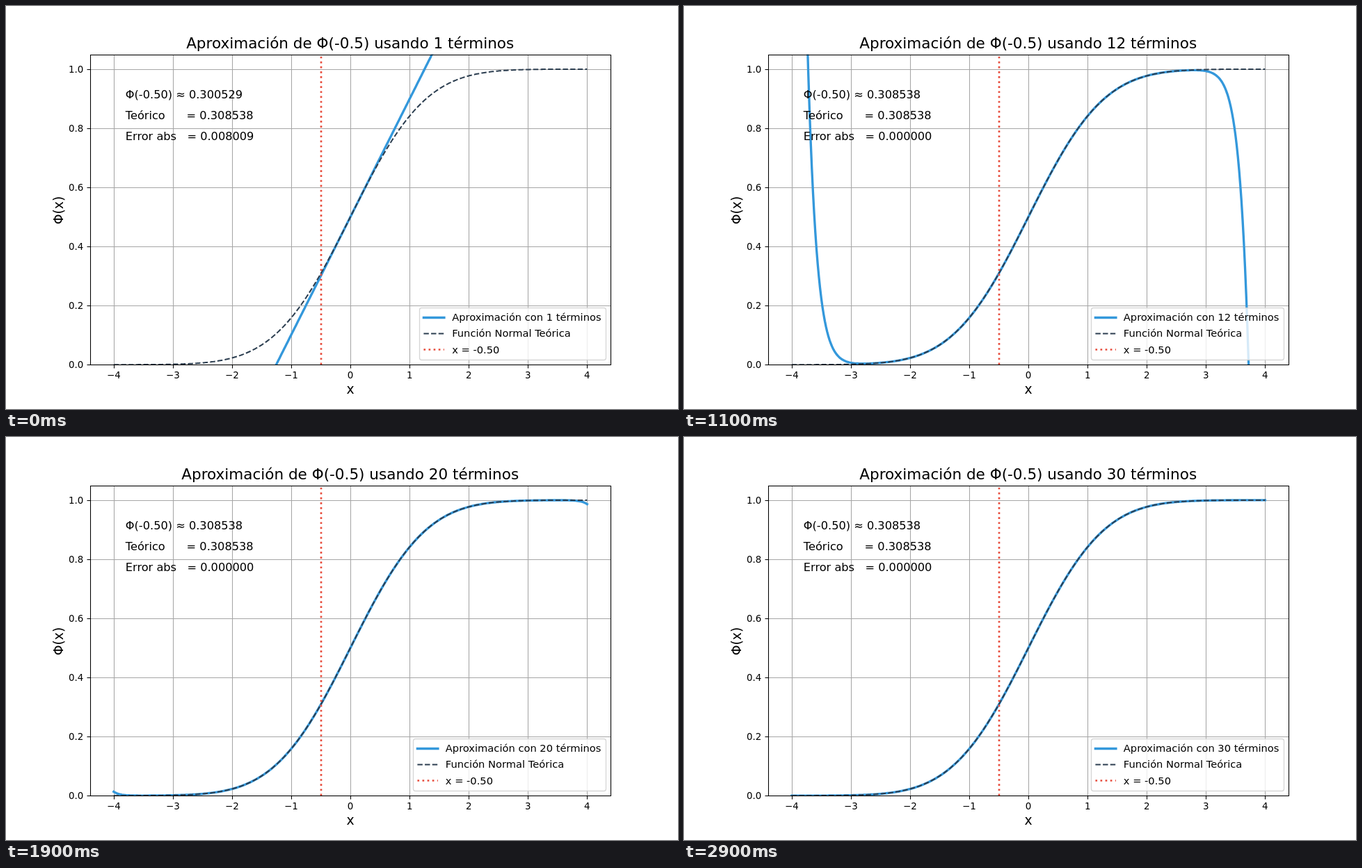
These frames come from a looping animation (966 px wide and 580 px high, 3 s). An HTML page with a canvas:

```html
<!DOCTYPE html>
<html lang="es">
<head>
<meta charset="utf-8">
<title>Aproximación de Φ(x)</title>
<style>
  html, body { margin: 0; width: 100%; height: 100%; overflow: hidden; background: #fff; }
  canvas { display: block; }
</style>
</head>
<body>
<canvas id="stage" width="966" height="580"></canvas>
<script>
const W = 966, H = 580, PT = W / 720;
const STEP_MS = 100, STEPS = 30, X0 = -0.5;
const LEFT = 0.125 * W, RIGHT = 0.9 * W, TOP = 0.12 * H, BOTTOM = 0.89 * H;
const BLUE = '#3498db', NAVY = '#2c3e50', RED = '#e74c3c', GRID = '#a6a6a6';
const ctx = document.getElementById('stage').getContext('2d');

const px = x => LEFT + (x + 4.4) / 8.8 * (RIGHT - LEFT);
const py = y => BOTTOM - y / 1.05 * (BOTTOM - TOP);
const snap = v => Math.floor(v + 0.5) + 0.5;

// Partial sum of the Taylor series of the normal distribution function.
function phi(x, terms) {
  let power = x, sum = 0;
  for (let k = 0; k < terms; k++) {
    sum += power / (2 * k + 1);
    power *= -x * x / (2 * (k + 1));
  }
  return 0.5 + sum / Math.sqrt(2 * Math.PI);
}
const exact = x => phi(x, 70);

// Baselines sit on whole pixels.
function text(str, x, y, points, align = 'left') {
  ctx.font = `${points * PT}px "DejaVu Sans", sans-serif`;
  ctx.textAlign = align;
  ctx.fillStyle = '#000';
  ctx.fillText(str, x, Math.round(y));
}

function stroke(points, color, width, dash = [], cap = 'butt') {
  ctx.beginPath();
  points.forEach(([x, y]) => ctx.lineTo(x, y));
  ctx.strokeStyle = color;
  ctx.lineWidth = width * PT;
  ctx.lineCap = cap;
  ctx.lineJoin = 'round';
  ctx.setLineDash(dash.map(d => d * width * PT));
  ctx.stroke();
  ctx.setLineDash([]);
}

const approxLine = points => stroke(points, BLUE, 2.5, [], 'square');
const exactLine = points => stroke(points, NAVY, 1.5, [3.7, 1.6]);
const markLine = points => stroke(points, RED, 2, [1, 1.65]);

function curve(fn) {
  const points = [];
  for (let i = 0; i <= 400; i++) {
    const x = -4 + i / 50;
    points.push([px(x), py(Math.max(-50, Math.min(50, fn(x))))]);
  }
  return points;
}

function drawGrid() {
  const l = snap(LEFT), r = snap(RIGHT), t = snap(TOP), b = snap(BOTTOM);
  for (let v = -4; v <= 4; v++) {
    const x = snap(px(v));
    stroke([[x, t], [x, b]], GRID, 0.8);
    stroke([[x, b], [x, b + 5]], '#000', 0.8);
    text(String(v).replace('-', '−'), px(v), 536, 10, 'center');
  }
  for (let i = 0; i <= 5; i++) {
    const y = snap(py(i / 5));
    stroke([[l, y], [r, y]], GRID, 0.8);
    stroke([[l - 5, y], [l, y]], '#000', 0.8);
    text((i / 5).toFixed(1), LEFT - 7 * PT, py(i / 5) + 4.9, 10, 'right');
  }
}

function drawFrame() {
  const l = snap(LEFT), t = snap(TOP);
  ctx.strokeStyle = '#000';
  ctx.lineWidth = 0.8 * PT;
  ctx.lineJoin = 'miter';
  ctx.strokeRect(l, t, snap(RIGHT) - l, snap(BOTTOM) - t);
}

function drawLegend(n) {
  const shift = n > 9 ? 9.4 : 0;
  const left = snap(594.4 - shift), labelX = 641.2 - shift;
  ctx.beginPath();
  ctx.roundRect(left, 434.5, 862.5 - left, 75, 3);
  ctx.fillStyle = 'rgba(255,255,255,0.8)';
  ctx.fill();
  ctx.strokeStyle = 'rgba(204,204,204,0.8)';
  ctx.lineWidth = PT;
  ctx.stroke();
  [
    [approxLine, `Aproximación con ${n} términos`],
    [exactLine, 'Función Normal Teórica'],
    [markLine, `x = ${X0.toFixed(2)}`]
  ].forEach(([line, label], i) => {
    const y = 448.5 + i * 23;
    line([[left + 5.9, y], [left + 35.4, y]]);
    text(label, labelX, 453 + i * 23.3, 10.93);
  });
}

function draw(n) {
  ctx.fillStyle = '#fff';
  ctx.fillRect(0, 0, W, H);
  drawGrid();

  ctx.save();
  ctx.beginPath();
  ctx.rect(LEFT, TOP, RIGHT - LEFT, BOTTOM - TOP);
  ctx.clip();
  approxLine(curve(x => phi(x, n)));
  exactLine(curve(exact));
  const markX = Math.round(px(X0));
  markLine([[markX, BOTTOM], [markX, TOP]]);
  ctx.restore();
  drawFrame();

  const value = phi(X0, n), theory = exact(X0);
  [
    `Φ(${X0.toFixed(2)}) ≈ ${value.toFixed(6)}`,
    `Teórico      = ${theory.toFixed(6)}`,
    `Error abs   = ${Math.abs(value - theory).toFixed(6)}`
  ].forEach((note, i) => text(note, px(-3.8), py(0.9 - 0.07 * i), 12.07));

  text(`Aproximación de Φ(${X0}) usando ${n} términos`, 494.7, 61, 16.06, 'center');
  text('x', (LEFT + RIGHT) / 2, 558, 14, 'center');
  ctx.save();
  ctx.translate(82, 294);
  ctx.rotate(-Math.PI / 2);
  text('Φ(x)', 0, 0, 14, 'center');
  ctx.restore();

  drawLegend(n);
}

const start = performance.now();
function tick() {
  const elapsed = performance.now() - start;
  draw(1 + Math.floor(elapsed / STEP_MS) % STEPS);
  requestAnimationFrame(tick);
}
tick();
</script>
</body>
</html>
```
